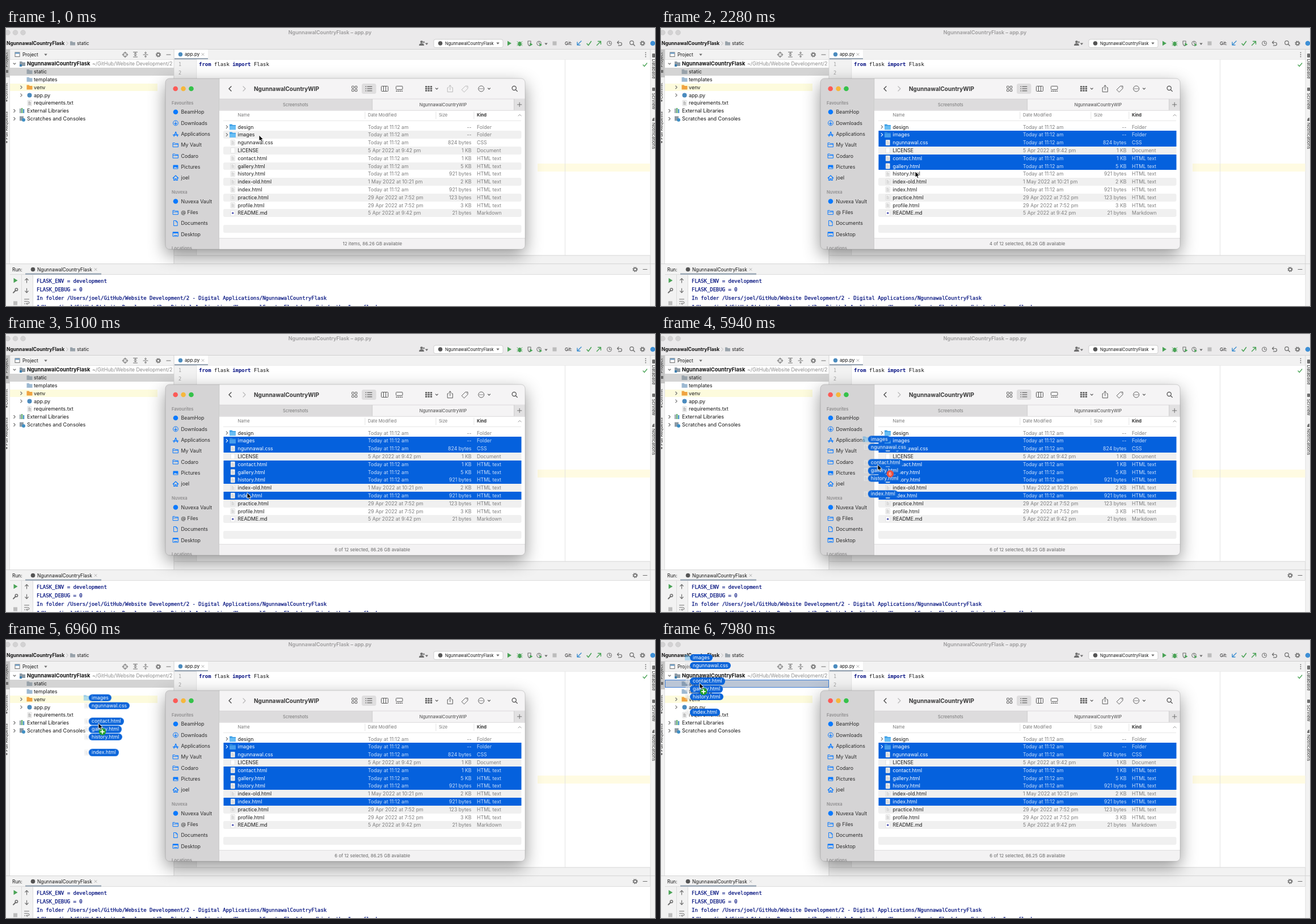
An HTML page for the animation above (8000 ms loop, 1144x490 px).

```html
<!DOCTYPE html>
<html lang="en">
<head>
<meta charset="utf-8">
<title>Dragging files into a project</title>
<style>
html, body { margin: 0; width: 100%; height: 100%; overflow: hidden; background: #fff; }
#stage { position: relative; width: 1144px; height: 490px; overflow: hidden; font-family: Inter, sans-serif; }
svg { position: absolute; left: 0; top: 0; overflow: visible; }
text { white-space: pre; }
.mono { font-family: "DejaVu Sans Mono", monospace; }
.console { stroke: #00107e; stroke-width: .25px; }
.shadow { filter: drop-shadow(0 10px 15px rgba(0,0,0,.42)); }
#pointer { position: absolute; left: 0; top: 0; animation: move 8s ease-in-out infinite; }
.pill {
  position: absolute; left: -17px; height: 12.6px; padding: 0 5px; border-radius: 6.3px;
  background: #0b65da; color: #fff; font-size: 8.8px; line-height: 12.4px; white-space: nowrap;
}
@keyframes move {
  0%, 8% { transform: translate(446px, 189px); }
  12%, 14% { transform: translate(446px, 202px); }
  19%, 21% { transform: translate(447px, 230px); }
  24.5%, 26% { transform: translate(448px, 244px); }
  28.5% { transform: translate(448px, 253px); }
  31% { transform: translate(448px, 257px); }
  38%, 40% { transform: translate(444px, 284px); }
  45.75%, 52% { transform: translate(439px, 312px); }
  63.75% { transform: translate(425px, 280px); }
  69%, 71% { transform: translate(421px, 233px); }
  80.25% { transform: translate(270px, 223px); }
  93% { transform: translate(76px, 85px); }
  94.5% { transform: translate(75.5px, 84.5px); }
  99.75%, 100% { transform: translate(68px, 76px); }
}
</style>
</head>
<body>
<div id="stage"></div>
<script>
const LOOP = 8000, GREY = '#6e6e6e', NAVY = '#00107e', BLUE = '#0a7aff';
let css = '', count = 0;

// Hard on/off between two times.
function timed(from, to, content, tag = 'g') {
  const name = 'show' + count++;
  css += `@keyframes ${name}{0%{opacity:${from ? 0 : 1}}` +
    (from ? `${from / LOOP * 100}%{opacity:1}` : '') +
    (to < LOOP ? `${to / LOOP * 100}%{opacity:0}` : '') +
    `100%{opacity:${to < LOOP ? 0 : 1}}}`;
  return `<${tag} style="animation:${name} 8s step-end infinite">${content}</${tag}>`;
}
const rect = (x, y, w, h, fill, rx = 0, more = '') =>
  `<rect x="${x}" y="${y}" width="${w}" height="${h}" fill="${fill}" rx="${rx}" ${more}/>`;
const dot = (x, y, r, fill, more = '') => `<circle cx="${x}" cy="${y}" r="${r}" fill="${fill}" ${more}/>`;
const ring = (x, y, r, color = GREY, w = 1) => dot(x, y, r, 'none', `stroke="${color}" stroke-width="${w}"`);
const line = (d, color = GREY, w = 1, fill = 'none') =>
  `<path d="${d}" fill="${fill}" stroke="${color}" stroke-width="${w}" stroke-linecap="round" stroke-linejoin="round"/>`;
const shape = (d, fill) => `<path d="${d}" fill="${fill}"/>`;
const text = (x, y, s, size = 8.8, fill = '#141414', more = '') =>
  `<text x="${x}" y="${y + size * .36}" font-size="${size}" fill="${fill}" ${more}>${s}</text>`;
const BOLD = 'font-weight="700"', SEMI = 'font-weight="600"', MID = 'text-anchor="middle"', END = 'text-anchor="end"';
const chevron = (x, y, color = GREY, s = 2.5, w = 1.1) =>
  line(`M${x - s / 2},${y - s}l${s},${s}l${-s},${s}`, color, w);
const down = (x, y, color = GREY, s = 2, w = 1.1) => line(`M${x - s},${y - s / 2}l${s},${s}l${s},${-s}`, color, w);
const caret = (x, y, color = GREY) => shape(`M${x - 2.7},${y - 1.5}h5.4l-2.7,3.4z`, color);
const cross = (x, y) => line(`M${x - 2},${y - 2}l4,4m0,-4l-4,4`, '#a5a5a5', .9);
const folder = (x, y, fill, w = 10, h = 8) =>
  shape(`M${x},${y - h / 2}h${w * .4}l1.2,1.4h${w * .6 - 1.2}v${h - 1.4}h${-w}z`, fill);
const finderFolder = (x, y) =>
  folder(x, y, '#3d9fe6', 11, 9.5) + rect(x, y - 2, 11, 6.8, '#74c6f7', .8, 'opacity=".8"');
const page = (x, y, ink = '#a9a9a9') =>
  rect(x, y - 4.7, 7.2, 9.4, '#fdfdfd', .6, 'stroke="#c9c9c9" stroke-width=".6"') +
  line(`M${x + 1.6},${y - 2.4}h3m-3,1.7h4m-4,1.7h4m-4,1.7h4`, ink, .7);
const search = (x, y, color = GREY, r = 3.3) => ring(x - 1, y - 1, r, color, 1.2) +
  line(`M${x + r - 2},${y + r - 2}l3,3`, color, 1.3);
const gear = (x, y) => ring(x, y, 2.6, GREY, 1.5) +
  dot(x, y, 3.9, 'none', `stroke="${GREY}" stroke-width="1.5" stroke-dasharray="1.5 1.56"`);
const minus = (x, y) => line(`M${x - 3.5},${y}h7`, GREY, 1.1);
const play = (x, y) => shape(`M${x - 3},${y - 4.2}l7,4.2l-7,4.2z`, '#4aa356');

// Row background on whole pixels, so neighbours join without a seam.
function band(x, y, w, fill, rx = 0) {
  const top = Math.round(y - 6.9);
  return rect(x, top, w, Math.round(y + 6.9) - top, fill, rx);
}

function ide() {
  const project = 'NgunnawalCountryFlask';
  const path = '/Users/joel/GitHub/Website Development/2 - Digital Applications/' + project;
  const side = (x, y, s, turn) => `<g transform="translate(${x},${y}) rotate(${turn})">${text(0, 0, s, 7.8, '#333', MID)}</g>`;
  let h = rect(0, 0, 1144, 490, '#f2f2f2') + rect(0, 0, 1144, 37, '#ebeaeb') + rect(0, 37, 1144, 1, '#d0d0d0');

  // title and toolbar
  h += [3, 16.5, 30].map(x => dot(x, 8, 4.3, '#d3d2d3', 'stroke="#c3c3c3" stroke-width=".6"')).join('');
  h += text(571, 7.5, project + ' – app.py', 9, '#9a999a', SEMI + MID);
  h += text(1, 27, project, 8.45, '#111', BOLD) + chevron(108, 27, '#aaa', 3, .8) + folder(113, 27, '#98a2aa', 9, 7) + text(125, 27, 'static', 8.4);
  h += dot(732.5, 24.5, 2.3, GREY) + shape('M728,31q0,-4 4.5,-4t4.5,4z', GREY) + dot(736.5, 25, 1.7, '#8b8b8b') + caret(741.5, 28);
  h += rect(754, 20, 122, 14.5, '#fff', 3, 'stroke="#c6c6c6" stroke-width=".8"') + dot(765.5, 27, 3.8, '#555') +
    text(774, 27, project, 7.4) + caret(867, 27);
  h += play(887, 27);
  h += `<ellipse cx="905.5" cy="28" rx="2.9" ry="4" fill="#4aa356"/>` + line('M901,24l9,7m0,-7l-9,7M901,28h9', '#4aa356', .9);
  h += line('M920,23h5v4q0,3 -2.5,4.5q-2.5,-1.5 -2.5,-4.5z', GREY, 1.1) + shape('M923.5,26l5,3l-5,3z', '#4aa356');
  h += ring(939.5, 27, 3.8) + line('M939.5,24.5v2.5l2,1') + shape('M940.5,27l4.5,2.7l-4.5,2.7z', '#4aa356') + caret(952, 28);
  h += rect(963.5, 23.5, 7, 7, '#bcbcbc') + text(985, 27, 'Git:', 8);
  h += line('M1014,23l-7,7m0,-5v5h5', '#3a8dd0', 1.4) + line('M1024,27.5l2.5,3l5,-7', '#4aa356', 1.5) + line('M1041.5,30.5l7,-7m-5,0h5v5', '#4aa356', 1.4);
  h += ring(1063.5, 27, 4) + line('M1063.5,24.5v2.8h2.2') + line('M1080,23l-2.5,2.5l2.5,2.5M1078,25.5h4.5q3,0 3,2.7t-3,2.7h-3', GREY, 1.2);
  h += search(1104, 27) + gear(1122, 27) + dot(1140, 27, 4.3, '#3d8fd6');

  // tool window edges
  h += rect(0, 38, 7, 49, '#c4c4c4') + rect(6.5, 38, .8, 378, '#d2d2d2');
  h += side(0, 56, 'Project', -90) + side(0, 111, 'Commit', -90) + side(0, 172, 'Pull Requests', -90);
  h += rect(0, 74, 4, 5, GREY) + dot(1, 128, 1.7, GREY) + dot(1, 201, 1.7, GREY);
  h += rect(1135.5, 38, .8, 452, '#d2d2d2') + side(1142, 72, 'Database', 90) + side(1142, 129, 'SciView', 90) + side(1142, 190, 'Notifications', 90);
  h += rect(1139, 45, 5, 7, GREY, 1) + rect(1139, 105, 5, 6, GREY, 1) + shape('M1139,164q0,-6 4,-6v6z', GREY);

  // project tree
  h += rect(7, 55.5, 289, 360, '#fff') + rect(7, 55, 289, .7, '#d6d6d6');
  h += rect(16, 43, 8, 7.5, '#fff', 0, `stroke="${GREY}"`) + rect(16, 43, 8, 2.5, '#6c9ac2') + text(29, 47, 'Project', 8.4) + caret(70, 47);
  h += ring(210, 47, 3.7) + line('M210,42v3.4m0,3.2v3.4M205,47h3.4m3.2,0h3.4');
  h += line('M224.5,42.5h7M224.5,51h7M228,44v5m-2,-1.5l2,1.5l2,-1.5M226,45.5l2,-1.5l2,1.5');
  h += line('M242,47h8M246,42v3m-1.6,-1.4l1.6,1.4l1.6,-1.4M246,52v-3m-1.6,1.4l1.6,-1.4l1.6,1.4') + gear(268.5, 47) + minus(286.5, 47);
  h += band(7, 77, 289, '#d4d4d4') + band(7, 104.5, 260, '#fdfbdd');
  h += down(15, 63) + folder(24, 63, '#8f9ba5') + rect(24, 64, 4, 4, '#3f7fae') + text(37, 63, project, 9.2, '#111', BOLD);
  h += `<g clip-path="url(#tree)">${text(152, 63, '~/GitHub/Website Development/2 - Digital', 8.9, '#8c8c8c')}</g>`;
  const tree = [['static', '#98a2aa'], ['templates', '#9db9d2'], ['venv', '#f0a440']];
  tree.forEach(([s, c], i) => h += folder(36.5, 77 + i * 13.8, c) + text(49, 77 + i * 13.8, s, 9));
  h += chevron(27, 104.5) + chevron(27, 118.4) + dot(41.5, 118.4, 4, '#4b8bbe') + text(49, 118.4, 'app.py', 9);
  h += page(38, 132.2, '#777') + text(49, 132.2, 'requirements.txt', 9);
  h += chevron(15, 146) + rect(24, 142, 2.2, 8, '#8d9aa4') + rect(27, 141, 2.2, 9, '#59a869') + rect(30, 143, 2.2, 7, '#3f8fc4') + text(37, 146, 'External Libraries', 9);
  h += chevron(15, 160) + rect(24, 155.5, 7, 8, '#8d9aa4') + dot(31, 162, 3, '#3f8fc4') + text(37, 160, 'Scratches and Consoles', 9);

  // editor
  h += rect(295.6, 38, .8, 378, '#cfcfcf') + rect(296.4, 55, 839, .7, '#d6d6d6');
  h += rect(297, 38, 59, 17, '#fff') + rect(297, 53, 59, 2.4, '#9ba8b6') + dot(307.5, 46.5, 3.7, '#4b8bbe') + text(315, 46.5, 'app.py', 8.2) + cross(347, 46.5);
  h += rect(336, 55.6, 799.5, 345, '#fff') + rect(335.5, 55.6, .7, 345, '#dcdcdc') + rect(937, 239, 198.5, 14, '#fffbe2') + rect(985, 55.6, .8, 345, '#dcdcdc');
  h += text(304, 64, '1', 8.6, '#a2a2a2', 'class="mono"') + text(304, 79, '2', 8.6, '#a2a2a2', 'class="mono"');
  const key = s => `<tspan font-weight="700" fill="#000c80">${s}</tspan>`;
  h += text(340, 64, key('from') + ' flask ' + key('import') + ' Flask', 8.95, '#111', 'class="mono"');
  h += [43.5, 47, 50.5].map(y => dot(1127.5, y, .9, GREY)).join('') + line('M1123,65l2.3,2.6l4.5,-5.6', '#4aa356', 1.4);
  h += rect(297, 400.5, 838.5, .8, '#d2d2d2') + rect(0, 415.3, 1144, .8, '#cdcdcd');

  // run panel
  h += text(11, 425.5, 'Run:', 8.4) + dot(47.5, 425.5, 3.8, '#555') + text(55, 425.5, project, 8.35) + cross(158, 425.5);
  h += rect(48, 434.5, 1087.5, 56, '#fff') + rect(7, 434, 1128, .7, '#d2d2d2') + rect(34, 432.3, 134, 2.5, '#9ba8b6') + gear(1109, 425.5) + minus(1126.5, 425.5);
  h += rect(27, 435, .7, 55, '#d2d2d2') + rect(47.3, 435, .7, 55, '#d2d2d2') + play(16.5, 445);
  h += line('M13,466.5l4,-4', GREY, 2) + ring(18.4, 461, 2.2, GREY, 1.5) + rect(13, 481.5, 7, 7, '#bdbdbd');
  h += line('M36.5,449v-7.5m-2.8,2.8l2.8,-2.8l2.8,2.8M36.5,459v7.5m-2.8,-2.8l2.8,2.8l2.8,-2.8', GREY, 1.2);
  h += line('M32.5,478h8M32.5,482h6q2.5,0 2.5,2t-2.5,2h-2.5m1.5,-1.5l-1.5,1.5l1.5,1.5M32.5,486h1.5');
  ['FLASK_ENV = development', 'FLASK_DEBUG = 0', 'In folder ' + path, `"${path}/venv/bin/python" -m flask run`]
    .forEach((s, i) => h += text(54, 445.7 + i * 15.2, s, 8.95, NAVY, 'class="mono console"'));
  return h;
}

// folder under the dragged files
const dropRow = (y, from, to) => timed(from, to,
  rect(7.5, Math.round(y - 6.9) + .5, 288, 13, 'rgba(60,125,225,.16)', 0, 'stroke="#3e7fd6"'));

const TODAY = 'Today at 11:12 am', HTML = 'HTML text';
const files = [
  ['design', TODAY, '--', 'Folder'],
  ['images', TODAY, '--', 'Folder', 540],
  ['ngunnawal.css', TODAY, '824 bytes', 'CSS', 1020],
  ['LICENSE', '5 Apr 2022 at 9:42 pm', '1 KB', 'Document'],
  ['contact.html', TODAY, '1 KB', HTML, 1560],
  ['gallery.html', TODAY, '5 KB', HTML, 1980],
  ['history.html', TODAY, '921 bytes', HTML, 2520],
  ['index-old.html', '1 May 2022 at 10:21 pm', '2 KB', HTML],
  ['index.html', TODAY, '921 bytes', HTML, 3120],
  ['practice.html', '29 Apr 2022 at 7:52 pm', '123 bytes', HTML],
  ['profile.html', '29 Apr 2022 at 7:52 pm', '3 KB', HTML],
  ['README.md', '5 Apr 2022 at 9:42 pm', '21 bytes', 'Markdown']
];
const rowY = i => 174.4 + i * 13.8;
const isFolder = f => f[3] === 'Folder';
const picked = files.filter(f => f[4]);

function fileRow(f, i, on) {
  const y = rowY(i), ink = on ? '#fff' : '#1c1c1c', soft = on ? '#c9defa' : '#7f7f7f';
  const blank = rect(396.2, y - 4.7, 7.2, 9.4, '#fff', .6, 'stroke="#d5d5d5" stroke-width=".6"');
  const icon = isFolder(f)
    ? chevron(389.5, y, on ? '#fff' : GREY) + `<g opacity="${on ? .65 : 1}">${finderFolder(394, y)}</g>`
    : f[0] === 'README.md' ? blank + dot(399.8, y, 1.6, '#4a4fb0')
    : f[0] === 'LICENSE' ? blank
    : page(396.2, y);
  return (on ? band(383.5, y, 525, '#0561dd') : '') + icon +
    text(408.5, y, f[0], 8.8, ink) + text(638, y, f[1], 8.75, soft) +
    text(820.5, y, f[2], 8.75, soft, END) + text(830, y, f[3], 8.75, soft);
}

function finder() {
  let h = rect(281, 89, 634, 301, '#f5f4f5', 7, 'class="shadow"') + '<g clip-path="url(#window)">';
  h += rect(281, 89, 95, 301, '#d5d4d5') + rect(375.5, 89, .8, 301, '#c4c3c4');
  ['#fc5b57', '#f6b73c', '#35c24a'].forEach((c, i) => h += dot(298.7 + i * 13.9, 107, 4.3, c));

  // sidebar
  const item = (y, s, icon) => h += icon + text(308.5, y, s, 8.8, '#2b2b2b');
  const head = (y, s) => h += text(292, y, s, 7.6, '#8e8d8e', SEMI);
  const blue = (d, w = 1.1) => line(d, BLUE, w);
  const box = y => line(`M294.5,${y - 3.5}h3l1,1.2h5v6h-9zM294.5,${y - .8}h9`, BLUE, 1);
  head(132, 'Favourites');
  item(148, 'BeamHop', dot(299, 148, 4.3, BLUE));
  item(167.5, 'Downloads', ring(299, 167.5, 4.4, BLUE) + blue('M299,165v5m-2,-2l2,2l2,-2'));
  item(187, 'Applications', blue('M296,191l3.2,-8l3.2,8M294.5,188.5h9', 1.3));
  item(206, 'My Vault', box(206));
  item(225.5, 'Codaro', box(225.5));
  item(245, 'Pictures', rect(294.5, 241.5, 9, 7, BLUE, 1) + shape('M295.5,247.5l2.5,-3l2,2l1.3,-1l1.5,2z', '#d5d4d5'));
  item(264, 'joel', blue('M294.3,264.5l4.7,-4.5l4.7,4.5M295.8,263.5v5h2.2v-3h2v3h2.2v-5', 1.2));
  head(289.5, 'Nuvexa');
  item(305.5, 'Nuvexa Vault', dot(299, 305.5, 4.3, BLUE));
  item(325, '@ Files', box(325));
  item(344, 'Documents', blue('M296,339.5h3.8l2.4,2.4v6.6h-6.2zM299.8,339.5v2.5h2.4', 1));
  item(363.5, 'Desktop', line('M294.5,359.8h9v7.4h-9z', BLUE, 1) + rect(294.5, 359.8, 9, 2.2, BLUE) + blue('M296.5,365.5h5', 1));
  head(388.5, 'Locations');

  // toolbar
  const ink = '#5b5b5b', pale = '#b9b9b9';
  h += chevron(395, 107, '#4a4a4a', -4, 1.4) + chevron(420, 107, pale, 4, 1.3) + text(437, 107, 'NgunnawalCountryWIP', 10, '#383838', BOLD);
  const cell = (x, y, s) => rect(x, y, s, s, 'none', .7, `stroke="${ink}" stroke-width="1"`);
  h += [[609.6, 102.4], [615.2, 102.4], [609.6, 108], [615.2, 108]].map(p => cell(...p, 3.7)).join('');
  h += rect(627, 98, 25.5, 18, '#dfdedf', 3.5) + line('M637,103.3h8m-8,3.7h8m-8,3.7h8', '#444', 1.1) + line('M634.2,103.3h.1m0,3.7h-.1m0,3.7h.1', '#444', 1.4);
  h += rect(661.5, 102.5, 12, 9, 'none', 1, `stroke="${ink}"`) + line('M665.5,102.5v9m4,-9v9', ink);
  h += rect(687.5, 102.5, 11.5, 6, 'none', 1, `stroke="${ink}"`) + line('M688,111.3h1.3m2,0h1.3m2,0h1.3m2,0h.8', ink, 1.5);
  for (let i = 0; i < 9; i++) h += rect(739 + i % 3 * 4.4, 102.3 + Math.floor(i / 3) * 3.5, 3.3, 2.4, ink, .5);
  h += down(759.3, 107, ink);
  const actions = c => line('M780,105h-1.8v7.7h9.2v-7.7h-1.8M782.8,109v-8m-2.3,2.2l2.3,-2.2l2.3,2.2', c) +
    line('M803.5,108.5l6.2,-6.2h4.3v4.3l-6.2,6.2zM811.9,104.4h.1', c);
  h += actions(pale) + timed(picked[0][4], LOOP, rect(776, 99, 41, 16, '#f5f4f5') + actions(ink));
  h += ring(837.7, 107, 5, ink) + [835.2, 837.7, 840.2].map(x => dot(x, 107, .8, ink)).join('') + down(851.5, 107, ink) + search(896.7, 107, '#4a4a4a', 3.6);

  // tabs and column heads
  h += rect(376, 125, 269.5, 20, '#dddcdd') + rect(376, 124.7, 539, .7, '#cfcecf') + rect(645.3, 125, .8, 20, '#c6c5c6');
  h += rect(895.5, 125, 19.5, 20, '#e2e1e2') + rect(895.3, 125, .8, 20, '#c6c5c6') + line('M901.5,135h7.4m-3.7,-3.7v7.4', GREY);
  h += text(510.5, 135, 'Screenshots', 7.6, '#757575', MID) + text(770.5, 135, 'NgunnawalCountryWIP', 7.6, '#444', MID);
  h += rect(376, 144.8, 539, 226, '#fff') + rect(376, 144.8, 539, .8, '#cfcecf') + rect(383, 163, 525, .7, '#dedede');
  [['Name', 408.5], ['Date Modified', 638], ['Size', 763]].forEach(([s, x]) => h += text(x, 153.7, s, 7.6, '#777'));
  h += text(830, 153.7, 'Kind', 7.6, '#333', BOLD) + line('M903,155l2.6,-2.6l2.6,2.6', '#888', .9);
  h += [632.5, 757.5, 824.5].map(x => rect(x, 147.5, .8, 13, '#dcdcdc')).join('');

  // list
  for (let i = 1; i < 14; i += 2) h += band(383, rowY(i), 525.5, '#f0f0f0', 3);
  files.forEach((f, i) => {
    h += fileRow(f, i, false);
    if (f[4]) h += timed(f[4], LOOP, fileRow(f, i, true));
  });

  // status line
  h += rect(376, 370.5, 539, 20, '#f3f2f3') + rect(376, 370.3, 539, .8, '#d8d7d8');
  const status = (s, from, to) => h += timed(from, to, text(645.8, 380.5, s + ' GB available', 7.9, '#666', MID));
  const free = 5820;
  status('12 items, 86.26', 0, picked[0][4]);
  picked.forEach((f, i) => status(`${i + 1} of 12 selected, 86.26`, f[4], i < 5 ? picked[i + 1][4] : free));
  status('6 of 12 selected, 86.25', free, LOOP);
  return h + '</g>' + rect(281, 89, 634, 301, 'none', 7, 'stroke="rgba(0,0,0,.22)" stroke-width=".7"');
}

function pointer() {
  const swap = 6720;
  let icons = '', pills = '';
  files.forEach((f, i) => {
    if (!f[4]) return;
    const y = (i - 4) * 13.8 - 3.5;
    icons += isFolder(f) ? finderFolder(-26, y) : page(-24.5, y);
    pills += `<span class="pill" style="top:${y - 6.3}px">${f[0]}</span>`;
  });
  const badge = timed(5700, swap, dot(22, 16, 6.2, '#f0503c') + text(22, 16, '6', 8, '#fff', MID)) +
    timed(swap, LOOP, dot(7, 14.8, 6.2, '#23a127') + line('M3.8,14.8h6.4M7,11.6v6.4', '#fff', 1.8));
  const arrow = line('M0,0V10L2.4,8L4,11.6L5.9,10.8L4.4,7.4H7.5Z', '#fff', .9, '#000');
  return '<div id="pointer">' +
    timed(5700, LOOP, `<svg width="1" height="1"><g opacity=".5">${icons}</g></svg>${pills}`, 'div') +
    `<svg width="1" height="1">${badge}${arrow}</svg></div>`;
}

const clips = `<defs><clipPath id="tree">${rect(7, 55, 288.5, 20, '#000')}</clipPath>` +
  `<clipPath id="window">${rect(281, 89, 634, 301, '#000', 7)}</clipPath></defs>`;
const drops = dropRow(104.5, 7140, 7260) + dropRow(90.7, 7260, 7680) + dropRow(77, 7680, LOOP);
document.getElementById('stage').innerHTML =
  `<svg width="1144" height="490">${clips}${ide()}${drops}${finder()}</svg>${pointer()}`;
document.head.appendChild(document.createElement('style')).textContent = css;
</script>
</body>
</html>
```
